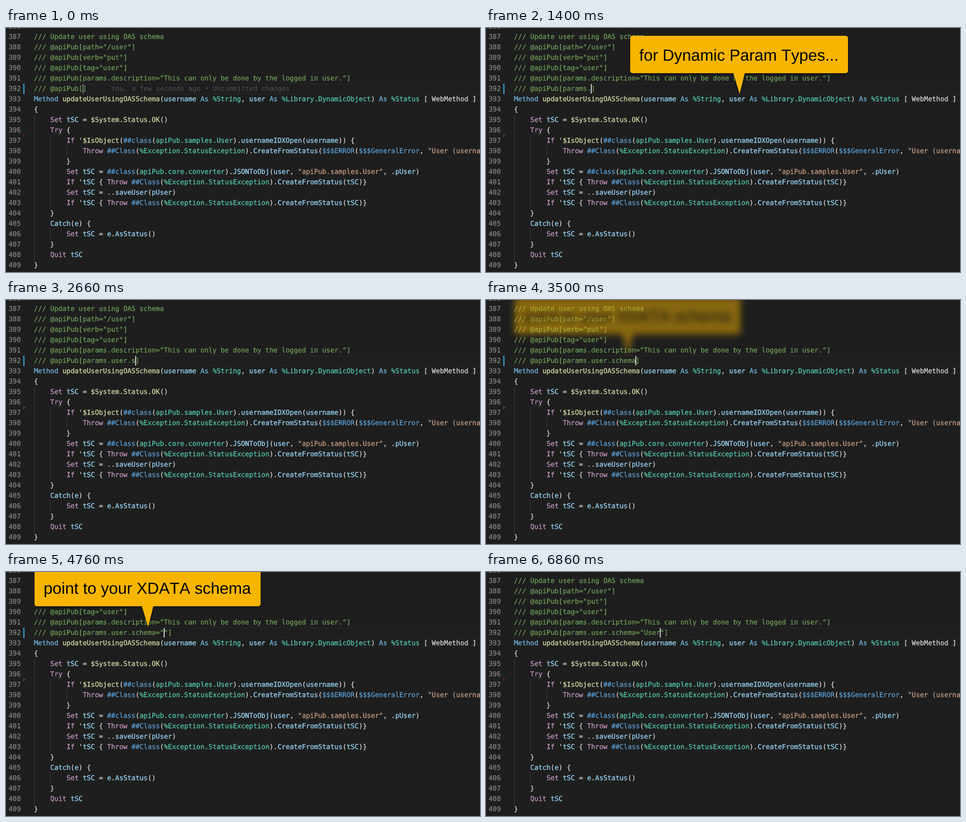
An HTML page for the animation above (6.98 s loop, 914 by 470 pixels).

```html
<!DOCTYPE html>
<html lang="en">
<head>
<meta charset="utf-8">
<style>
  html, body { margin: 0; width: 100%; height: 100%; overflow: hidden; background: #1e1e1e; }
  #stage { position: relative; width: 914px; height: 470px; overflow: hidden; color: #d8d8d8;
    font: 13px/20px "DejaVu Sans Mono", monospace; text-rendering: geometricPrecision; }
  #stage > * { position: absolute; }
  .num, .line { -webkit-text-stroke: .25px currentColor; }
  .num { left: 5px; color: #858585; }
  .line { left: 54px; white-space: pre; }
  .guide { width: 1px; background: #404040; }
  .c { color: #6f9f5a; } .s { color: #c9a085; } .k { color: #c79ac5; } .b { color: #5aa0d8; }
  .m { color: #70b8e6; } .t { color: #56ccb2; } .f { color: #dcdcaa; } .v { color: #9cdcfe; }
  #row { left: 44px; top: 107px; width: 870px; height: 20px; box-sizing: border-box;
    border: solid #282828; border-width: 1.5px 0; }
  #bar { left: 33px; top: 107px; width: 3px; height: 20px; background: #2f80a8; }
  #mark { left: 33px; top: 204px; width: 5px; height: 7px; clip-path: polygon(0 0, 100% 50%, 0 100%); }
  #blame { left: 203px; top: 108px; color: #505050; white-space: pre; }
  #caret { top: 108px; width: 1.5px; height: 18px; background: #c8c8c6; }
  .callout { overflow: visible; }
  .callout path { fill: #f7b500; filter: drop-shadow(0 1px 2px rgba(0, 0, 0, .5)); }
  .callout text { font: 31px "Liberation Sans", Arial, sans-serif; font-kerning: none; fill: #000; }
</style>
</head>
<body>
<div id="stage"></div>
<script>
const LOOP = 6980, STEP = 140, CHAR = 13 * 0.60205, FIRST = 386;
const stage = document.getElementById('stage');

const code = `
/// Update user using OAS schema
/// @apiPub[path="/user"]
/// @apiPub[verb="put"]
/// @apiPub[tag="user"]
/// @apiPub[params.description="This can only be done by the logged in user."]
/// @apiPub[]
Method updateUserUsingOASSchema(username As %String, user As %Library.DynamicObject) As %Status [ WebMethod ]
{
    Set tSC = $System.Status.OK()
    Try {
        If '$IsObject(##class(apiPub.samples.User).usernameIDXOpen(username)) {
            Throw ##Class(%Exception.StatusException).CreateFromStatus($$$ERROR($$$GeneralError, "User (username)
        }
        Set tSC = ##class(apiPub.core.converter).JSONToObj(user, "apiPub.samples.User", .pUser)
        If 'tSC { Throw ##Class(%Exception.StatusException).CreateFromStatus(tSC)}
        Set tSC = ..saveUser(pUser)
        If 'tSC { Throw ##Class(%Exception.StatusException).CreateFromStatus(tSC)}
    }
    Catch(e) {
        Set tSC = e.AsStatus()
    }
    Quit tSC
}`.split('\n');

const rules = [
  ['c', '^///.*'],
  ['s', '"[^"]*"?'],
  ['w', '\\[ WebMethod \\]'],
  ['k', '\\b(?:Set|Try|If|Throw|Quit)\\b'],
  ['b', '##[cC]lass|\\$\\$\\$\\w+'],
  ['m', '\\b(?:Method|As)\\b'],
  ['t', '%[\\w.]+|(?<=\\()apiPub[\\w.]+'],
  ['f', '\\$\\w[\\w.]*|updateUser\\w+'],
  ['v', '[a-zA-Z]\\w*']
];
const lexer = new RegExp(rules.map(([name, re]) => `(?<${name}>${re})`).join('|'), 'g');

function paint(line) {
  return line.replace(lexer, (...m) => {
    const groups = m.at(-1);
    return `<span class="${Object.keys(groups).find(g => groups[g])}">${m[0]}</span>`;
  });
}

function add(props, style = {}) {
  const el = Object.assign(document.createElement('div'), props);
  Object.assign(el.style, style);
  return stage.appendChild(el);
}

const rowTop = n => (n - FIRST) * 20 - 13;

add({ id: 'row' });
[[0, 395, 408], [1, 397, 403], [2, 398, 398], [1, 406, 406]].forEach(([level, from, to]) =>
  add({ className: 'guide' }, {
    left: 54 + level * 4 * CHAR + 'px',
    top: rowTop(from) + 'px',
    height: (to - from + 1) * 20 + 'px'
  }));
const lines = code.map((line, i) => {
  const top = rowTop(FIRST + i) + 1 + 'px';
  add({ className: 'num', textContent: FIRST + i }, { top });
  return add({ className: 'line', innerHTML: paint(line) }, { top });
});
const bar = add({ id: 'bar' });
const mark = add({ id: 'mark' });
const blame = add({ id: 'blame', textContent: 'You, a few seconds ago • Uncommitted changes' });
const caret = add({ id: 'caret' });
const typedLine = lines[6];
typedLine.className = 'line c';

// Speech boxes: blurred fade in, plain fade out
const FADE = 700;
const callouts = [
  { text: 'for Dynamic Param Types...', x: 278, y: 15, w: 420, tip: 211, start: 480, end: 1770 },
  { text: 'point to your XDATA schema', x: 55, y: -6, w: 436, tip: 219, start: 3160, end: 6110 }
];
for (const c of callouts) {
  stage.insertAdjacentHTML('beforeend',
    `<svg class="callout" width="${c.w}" height="112" style="left:${c.x}px;top:${c.y}px">
      <path d="M5 0H${c.w - 5}q5 0 5 5V67q0 5-5 5H${c.tip + 10}L${c.tip} 112L${c.tip - 12} 72H5q-5 0-5-5V5q0-5 5-5z"/>
      <text x="17.6" y="48">${c.text}</text>
    </svg>`);
  c.el = stage.lastElementChild;
}

const clamp = v => Math.max(0, Math.min(1, v));

const typed = 'params.user.schema="User';
const keyTimes = [
  140, 280, 420, 560, 700, 840, 980,
  1680, 1820, 1960, 2100, 2380,
  2660, 2800, 2940, 3080, 3220, 3360,
  4340, 4620, 5460, 5740, 6300, 6580
];

function draw(t) {
  const n = keyTimes.filter(k => k <= t).length;
  typedLine.textContent = '/// @apiPub[' + typed.slice(0, n) + (n > 19 ? '"]' : ']');
  caret.style.left = 54 + (12 + n) * CHAR - 0.3 + 'px';
  caret.style.visibility = t >= 5320 && t < 5460 ? 'hidden' : 'visible';
  blame.style.visibility = n ? 'hidden' : 'visible';
  bar.style.visibility = t < 6860 ? 'visible' : 'hidden';
  const warm = Math.sin(Math.PI * t / LOOP);
  mark.style.background = `rgb(100, ${30 + 36 * warm}, 18)`;

  for (const c of callouts) {
    const fadeIn = clamp((t - c.start) / FADE);
    const alpha = fadeIn * (1 - clamp((t - c.end) / FADE));
    c.el.style.opacity = alpha;
    c.el.style.filter = fadeIn < 1 ? `blur(${9 * Math.sqrt(1 - fadeIn)}px)` : 'none';
  }
}

function frame(now) {
  draw(Math.floor((now % LOOP) / STEP) * STEP);
  requestAnimationFrame(frame);
}
draw(0);
requestAnimationFrame(frame);
</script>
</body>
</html>
```
